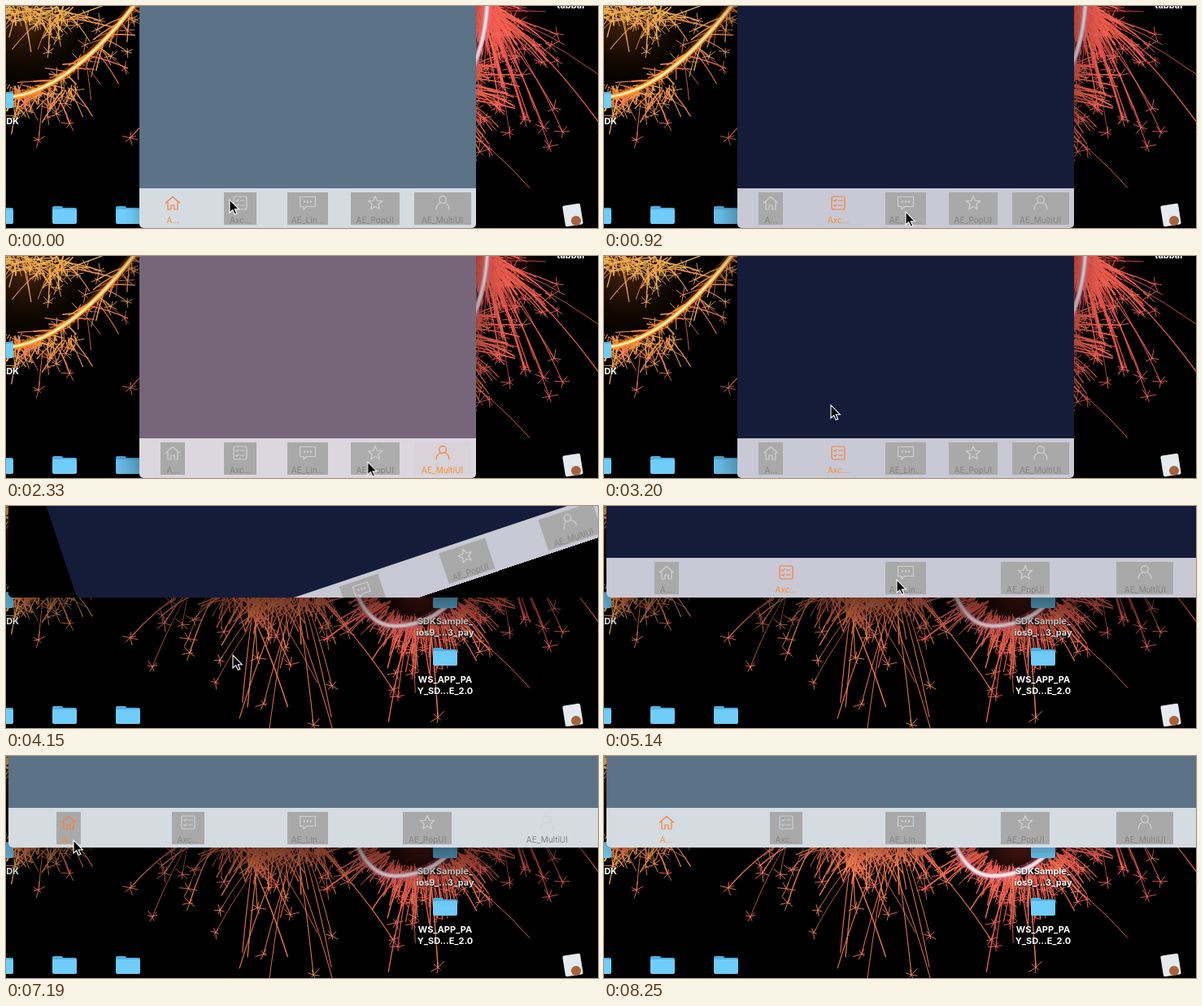
Animation of 728x274 px, one loop 8.35 s. Source, as an HTML page with a canvas:

```html
<!DOCTYPE html>
<html lang="en">
<head>
<meta charset="utf-8">
<title>Tab bar demo</title>
<style>
  html, body { margin: 0; width: 100%; height: 100%; overflow: hidden; background: #000; }
  #stage { position: relative; width: 728px; height: 274px; overflow: hidden; font-family: Inter, Roboto, sans-serif; }
  #desk { position: absolute; left: 0; top: 0; }
  .name {
    position: absolute; width: 100px; text-align: center; white-space: pre;
    font-size: 11px; font-weight: 700; line-height: 14px; color: #fff; text-shadow: 0 1px 2px #000;
  }
  #win {
    position: absolute; overflow: hidden; background: #000; border-radius: 5px;
    animation: win 8350ms step-end infinite, focus 8350ms step-end infinite;
  }
  #ui {
    position: absolute; left: 50%; top: 50%; background: var(--page);
    animation: turn 8350ms ease-in-out infinite, page 8350ms step-end infinite;
  }
  #bar { position: absolute; left: 0; right: 0; bottom: 0; height: 49px; display: flex; background: var(--bar); }
  .tab { flex: 1; display: flex; justify-content: center; }
  .box { position: relative; height: 40px; margin-top: 5px; }
  .plate { position: absolute; inset: 0; background: #a9a9a9; }
  .box svg {
    position: absolute; left: 50%; top: 3px; margin-left: -10px; color: var(--icon);
    fill: none; stroke: currentColor; stroke-width: 1.2; stroke-linejoin: round; stroke-linecap: round;
  }
  .box b {
    position: absolute; left: -10px; right: -10px; top: 27.5px; text-align: center;
    font-size: 10px; font-weight: 400; line-height: 12px; color: var(--label);
  }
  #cursor { position: absolute; left: -2px; top: -2px; animation: cursor 8350ms ease-in-out infinite; }
</style>
</head>
<body>
<div id="stage">
  <canvas id="desk" width="728" height="274"></canvas>
  <div class="name" style="left:-42px;top:135px;text-align:right;width:58px">DK</div>
  <div class="name" style="left:645px;top:-8px">tabbar</div>
  <div class="name" style="left:490px;top:135px">SDKSample_
ios9_...3_pay</div>
  <div class="name" style="left:490px;top:207px">WS_APP_PA
Y_SD...E_2.0</div>
  <div id="win"><div id="ui"><div id="bar"></div></div></div>
  <svg id="cursor" width="18" height="24" viewBox="-2 -2 18 24">
    <path d="M0 0V16L3.7 12.6L6.3 18.3L8.8 17.2L6.3 11.7H11.3Z" fill="#000" stroke="#fff" stroke-width="1.1"/>
  </svg>
</div>
<script>
const LOOP = 8350, TURN = 3907, TURNED = 4263, FADE = 200;
const $ = id => document.getElementById(id);
const rad = deg => deg * Math.PI / 180;

// ---- Tabs ----
const starPoints = Array.from({ length: 10 }, (_, k) => {
  const r = k % 2 ? 4 : 9, a = rad(k * 36 - 90);
  return `${10 + r * Math.cos(a)},${10.5 + r * Math.sin(a)}`;
}).join(' ');
const listRow = y => `<path d="M4.8 ${y}l1.2 1.2l2-2.4M10.3 ${y}h5"/>`;
const dot = x => `<circle cx="${x}" cy="8.5" r=".6"/>`;

const tabs = [
  { label: 'A…', page: '#5c7286', bar: '#d4dce2',
    icon: '<path d="M1.5 10L10 2.5L18.5 10M4 9V18H8V13H12V18H16V9"/>' },
  { label: 'Axc…', page: '#151c39', bar: '#c8c9d5',
    icon: `<rect x="2" y="2" width="16" height="16" rx="2"/>${listRow(7)}${listRow(13)}` },
  { label: 'AE_Lin…', page: '#66776f', bar: '#d8ddda',
    icon: `<path d="M.5 2.5H19.5V14.5H8.5L5 18V14.5H.5Z"/>${[6, 10, 14].map(dot).join('')}` },
  { label: 'AE_PopUI', page: '#ae754c', bar: '#ecdacc',
    icon: `<polygon points="${starPoints}"/>` },
  { label: 'AE_MultiUI', page: '#77667a', bar: '#dcd7de',
    icon: '<circle cx="10" cy="6" r="4.3"/><path d="M2 18Q2.3 11.6 7.6 9.8M12.4 9.8Q17.7 11.6 18 18"/>' },
];

// ---- Timeline ----
const tap = (ms, tab) => ({ ms, tab, wide: ms > TURN });
const taps = [
  tap(0, 0), tap(520, 1), tap(1160, 2), tap(1620, 3), tap(2150, 4), tap(2800, 1),
  tap(5260, 2), tap(5780, 3), tap(6450, 4), tap(7190, 0),
];

const rules = [];
const keyframes = (name, frames) => rules.push(`@keyframes ${name}{${
  frames.map(([ms, css]) => `${(ms / LOOP * 100).toFixed(4)}%{${css}}`).join('')}}`);

keyframes('win', [
  [0, 'left:164px;top:-462px;width:414px;height:736px'],
  [TURN, 'left:3px;top:-301px;width:736px;height:414px']]);

const blurred = 'box-shadow:0 8px 20px rgba(0,0,0,.3)';
keyframes('focus', [[0, blurred], [520, 'box-shadow:0 24px 50px rgba(0,0,0,.6)'], [8250, blurred]]);

keyframes('page', taps.map(({ ms, tab }) => [ms, `--page:${tabs[tab].page};--bar:${tabs[tab].bar}`]));

const pose = (w, h, deg) => `width:${w}px;height:${h}px;transform:translate(-50%,-50%) rotate(${deg}deg)`;
keyframes('turn', [
  [0, pose(414, 736, 0)], [TURN - 0.1, pose(414, 736, 0)],
  [TURN, pose(414, 736, -90)], [TURNED, pose(736, 414, 0)], [LOOP, pose(736, 414, 0)]]);

// The pointer rests on a tab, then heads for the next one right after each tap
const at = (x, y) => `transform:translate(${x}px,${y}px)`;
const spot = ({ tab, wide }) => wide
  ? at(360 + 138.5 * (tab - 2), 91 - 6.5 * (tab - 2)) : at(371 + 87 * (tab - 2), 254);
const path = [[0, at(275, 239)]];
const go = (start, end, place) => path.push([start, path.at(-1)[1]], [end, place]);

taps.forEach((now, k) => {
  const next = taps[k + 1], start = now.ms + 60, end = now.ms + 340;
  if (!next) go(start, end + 240, at(110, 285));
  else if (next.wide === now.wide) go(start, end, spot(next));
  else {
    go(start, end, at(279, 184));
    go(4520, 4960, at(360, 73));
    go(5080, 5140, spot(next));
  }
});
path.push([LOOP, path.at(-1)[1]]);
keyframes('cursor', path);

tabs.forEach(({ label, icon }, i) => {
  keyframes(`ink${i}`, taps.map(({ ms, tab }) => [ms, tab === i
    ? '--icon:#fb7d36;--label:#fb8d2e' : '--icon:#d2d2d2;--label:#828282']));

  const plateAt = k => `opacity:${taps[k].tab === i ? 0 : 1}`;
  const plate = [[0, plateAt(0)]];
  for (let k = 1; k < taps.length; k++) {
    plate.push([taps[k].ms, plateAt(k - 1)], [taps[k].ms + FADE, plateAt(k)]);
  }
  keyframes(`plate${i}`, [...plate, [LOOP, plateAt(taps.length - 1)]]);

  $('bar').insertAdjacentHTML('beforeend', `<div class="tab">
    <div class="box" style="width:${30 + 10 * i}px;animation:ink${i} ${LOOP}ms step-end infinite">
      <div class="plate" style="animation:plate${i} ${LOOP}ms linear infinite"></div>
      <svg width="20" height="20" viewBox="0 0 20 20">${icon}</svg><b>${label}</b>
    </div></div>`);
});

// ---- Desktop ----
const c = $('desk').getContext('2d');
let seed = 11;
const rnd = (a = 0, b = 1) => {
  seed = (seed * 16807) % 2147483647;
  return a + (b - a) * seed / 2147483647;
};

function line(color, width, draw) {
  c.strokeStyle = color;
  c.lineWidth = width;
  c.beginPath();
  draw();
  c.stroke();
}

// A streak that sags a little and may split into a small star at its tip
function spark(x, y, deg, len, hue, star) {
  const a = rad(deg), dx = Math.cos(a) * len, dy = Math.sin(a) * len;
  const ex = x + dx, ey = y + dy + len * 0.06;
  const shape = () => {
    c.moveTo(x, y);
    c.quadraticCurveTo(x + dx * 0.55, y + dy * 0.45, ex, ey);
  };
  const width = rnd(0.7, 1.8);
  line(`hsla(${hue},85%,58%,.85)`, width, shape);
  line(`hsla(${hue + 12},95%,80%,.6)`, width * 0.4, shape);
  if (rnd() > star) return;
  line(`hsla(${hue},85%,65%,.9)`, 1, () => {
    for (let k = 0; k < 6; k++) {
      const b = a + rad(k * 60 + rnd(-20, 20)), r = rnd(3, 11);
      c.moveTo(ex, ey);
      c.lineTo(ex + Math.cos(b) * r, ey + Math.sin(b) * r);
    }
  });
}

// Sparks leave a flat cloud, or a ring when a radius is given
function burst({ n, x, y, spread = 0, ring = 0, dir = 90, open, reach, hue, star = 0.2 }) {
  for (let i = 0; i < n; i++) {
    const deg = dir + rnd(-open, open), a = rad(deg);
    const px = x + rnd(-spread, spread) + ring * Math.cos(a);
    const py = y + rnd(-8, 8) + ring * Math.sin(a);
    spark(px, py, deg + rnd(-20, 20), reach * (0.12 + 0.88 * rnd() ** 2), hue + rnd(-6, 6), star);
  }
}

function glow(x, y, r, color) {
  const g = c.createRadialGradient(x, y, 0, x, y, r);
  g.addColorStop(0, color);
  g.addColorStop(1, 'transparent');
  c.fillStyle = g;
  c.fillRect(x - r, y - r, 2 * r, 2 * r);
}

function trail(colors, draw) {
  colors.forEach((color, k) => line(color, 12 / 2 ** k, draw));
}

c.fillRect(0, 0, 728, 274);
c.lineCap = 'round';
glow(25, 15, 110, 'rgba(150,75,15,.5)');
glow(590, 10, 85, 'rgba(200,50,45,.6)');
glow(325, 90, 75, 'rgba(200,65,35,.6)');
glow(510, 100, 85, 'rgba(200,55,45,.6)');

// Sparkler on the left
burst({ n: 150, x: 25, y: 12, spread: 60, open: 180, reach: 50, hue: 33 });
burst({ n: 70, x: 40, y: 105, spread: 45, open: 60, reach: 45, hue: 26 });
burst({ n: 4, x: 55, y: 110, spread: 15, open: 30, reach: 90, hue: 16, star: 1 });
for (let t = 0; t < 1; t += 0.012) {
  spark(160 * t, 114 - 114 * t ** 1.7, rnd(-10, 200), 6 + 44 * rnd() ** 2, rnd(10, 32), 0.2);
}
trail(['rgba(255,110,10,.3)', '#ff9a26', '#ffd873', '#fffbe6'], () => {
  c.moveTo(-5, 113);
  c.bezierCurveTo(55, 112, 112, 60, 163, -8);
});

// Fireworks in the middle and on the right
burst({ n: 170, x: 330, y: 108, spread: 65, open: 70, reach: 60, hue: 12 });
burst({ n: 42, x: 330, y: 95, spread: 45, open: 45, reach: 200, hue: 14, star: 0.6 });
burst({ n: 9, x: 250, y: 105, spread: 30, dir: 125, open: 15, reach: 130, hue: 14, star: 1 });
burst({ n: 330, x: 512, y: 83, ring: 62, open: 100, reach: 62, hue: 6, star: 0.25 });
burst({ n: 22, x: 512, y: 85, ring: 55, open: 60, reach: 135, hue: 8, star: 0.7 });
burst({ n: 170, x: 588, y: 0, spread: 10, dir: 60, open: 60, reach: 105, hue: 4 });
burst({ n: 34, x: 592, y: 10, spread: 10, dir: 65, open: 22, reach: 220, hue: 4, star: 0.7 });
trail(['rgba(220,120,190,.3)', '#f0a3a3', '#fbeef0'], () => {
  c.moveTo(592, -8);
  c.bezierCurveTo(590, 65, 555, 148, 478, 148);
  c.quadraticCurveTo(445, 148, 428, 100);
});

function block(color, x, y, w, h) {
  c.fillStyle = color;
  c.beginPath();
  c.roundRect(x, y, w, h, 2);
  c.fill();
}
function folder(x, y) {
  block('#4fb0e2', x, y, 13, 8);
  block('#4fb0e2', x, y + 2, 30, 10);
  block('#70cdfa', x, y + 4, 30, 18);
}
for (const x of [-21, 57, 135]) folder(x, 247);
for (const x of [-21, 525]) folder(x, 104);
folder(525, 175);

// Tilted document
c.save();
c.translate(697, 258);
c.rotate(rad(-9));
block('#e4eaee', -11, -13, 22, 26);
c.restore();
c.fillStyle = '#a8623c';
c.beginPath();
c.arc(701, 265, 6, 0, 7);
c.fill();

const sheet = document.createElement('style');
sheet.textContent = rules.join('\n');
document.head.append(sheet);
</script>
</body>
</html>
```
